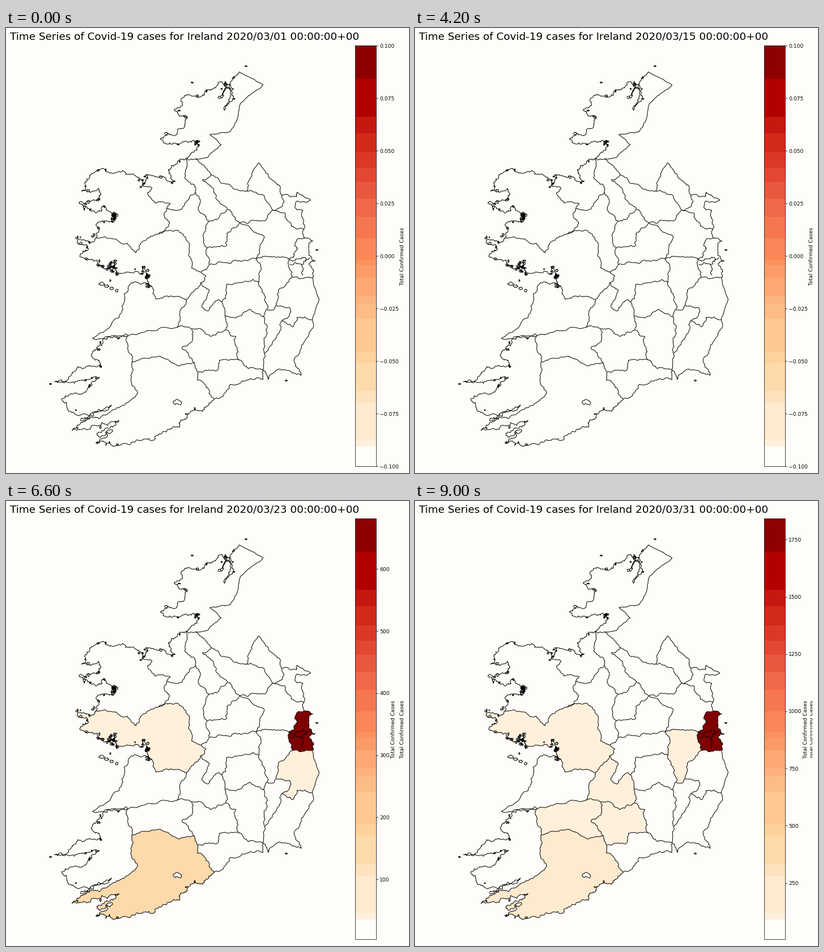
A matplotlib script that plays this animation: 711x787 px, repeating every 9300 ms.

```python
import numpy as np
import matplotlib.pyplot as plt
from matplotlib.animation import FuncAnimation
from matplotlib.collections import LineCollection
from matplotlib.patches import Polygon, Rectangle

W, H, DPI = 711, 787, 64
PX = 72 / DPI          # points per pixel
EM = 9.19 * PX         # small text; the title is twice as large
BG = "#fefdf9"
plt.rcParams["font.family"] = "DejaVu Sans"
rng = np.random.default_rng(19)

fig = plt.figure(figsize=(W / DPI, H / DPI), dpi=DPI, facecolor=BG)
ax = fig.add_axes([0, 0, 1, 1])
ax.set(xlim=(-0.5, W - 0.5), ylim=(H - 0.5, -0.5))
ax.axis("off")

# ---- map: borders run between shared junctions ------------------------
NODES = dict(
    mal=(411, 77), don=(317, 231), erne=(334, 231), cav=(361, 258), lei=(390, 320),
    car=(357, 341), slg=(334, 290), glen=(283, 319), moy=(240, 279), ros=(268, 364),
    kil=(160, 371), inny=(355, 388), ree=(358, 418), shan=(344, 431), port=(343, 450),
    derg=(318, 480), kin=(257, 457), lim=(301, 529), est=(214, 544), new=(327, 532),
    gal=(332, 592), mul=(222, 590), ken=(148, 687), tip=(338, 608), you=(367, 656),
    wat=(453, 604), sui=(412, 587), urn=(387, 533), dur=(386, 508), bir=(380, 484),
    mon=(446, 449), ede=(441, 408), may=(499, 409), bla=(504, 440), bray=(541, 440),
    ath=(476, 490), cas=(460, 497), barr=(455, 511), bal=(486, 517), ark=(540, 516),
    bor=(456, 575), gor=(527, 371), dro=(525, 356), fin=(412, 344), kells=(471, 322),
    clon=(424, 288), cul=(486, 295), carl=(512, 298))
paths, loops = {}, []


def roughen(p, r, levels):
    """Midpoint displacement: a natural line from a few points."""
    p = np.asarray(p, float)
    for _ in range(levels):
        d = np.diff(p, axis=0)
        shift = rng.normal(0, r, (len(d), 1)).clip(-1.5 * r, 1.5 * r)
        shift *= np.minimum(1, 16 / np.hypot(*d.T))[:, None]
        mid = (p[:-1] + p[1:]) / 2 + np.c_[-d[:, 1], d[:, 0]] * shift
        out = np.empty((2 * len(p) - 1, 2))
        out[::2], out[1::2] = p, mid
        p = out
    return p


def border(a, b, *xy, r=0.13, levels=4):
    bends = [xy[i:i + 2] for i in range(0, len(xy), 2)]
    paths[a, b] = roughen([NODES[a], *bends, NODES[b]], r, levels)


def isle(x, y, w, h):
    a = np.linspace(0, 2 * np.pi, 7)
    loops.append(roughen(np.c_[x + w / 2 * np.cos(a), y + h / 2 * np.sin(a)], 0.2, 2))


def scatter(points, spread):
    for x, y in points:
        dx, dy = rng.normal(0, spread, 2)
        isle(x + dx, y + dy, *rng.uniform(1.5, 5, 2))


def wild(a, b, *xy, isles=6):
    """Torn coast with small islands strewn along it."""
    border(a, b, *xy, r=0.22, levels=5)
    scatter(rng.choice(paths[a, b], isles), 3)


# north
border("mal", "erne", 453, 100, 413, 133, 407, 163, 395, 183, 359, 188, 379, 206, 354, 229, r=0.06)
wild("don", "mal", 340, 208, 336, 200, 300, 204, 272, 195, 308, 178, 317, 159, 296, 144, 317, 118,
     350, 112, 381, 95, 380, 124, 386, 94, 395, 122, 385, 145, 402, 125, 394, 100, isles=16)
border("don", "erne")
border("erne", "cav", 353, 248)
border("cav", "lei", 346, 268, 360, 278, 371, 303)
border("lei", "car", 372, 338)
border("don", "slg", 316, 251, 315, 264, 331, 276)
border("slg", "car", 342, 307, 341, 325)
border("car", "inny", 347, 366)
wild("don", "moy", 286, 250, 298, 270, 268, 264, 246, 259)
border("moy", "glen", 257, 283, 249, 291, 262, 309, 289, 310)
border("slg", "glen", 317, 307, 310, 320)
border("glen", "ros", 279, 333, 288, 343)
border("cav", "clon", 378, 273)
border("clon", "cul", 428, 270, 445, 238, 462, 258, 482, 278)
border("clon", "kells", 452, 294)
border("cul", "kells", 487, 315)
border("cul", "carl")
border("carl", "dro", 513, 290, 537, 304, 512, 306, 513, 321, 523, 322)
border("kells", "dro", 492, 327, 503, 350)
border("kells", "fin", 455, 341)
border("lei", "fin")

# west
wild("moy", "kil", 229, 262, 173, 250, 147, 260, 133, 288, 163, 283, 160, 304, 128, 309, 160, 326,
     172, 313, 194, 327, 190, 342, 160, 346, isles=24)
border("kil", "ros", 213, 380, 229, 397, 249, 371)
border("ros", "shan", 302, 357, 318, 375, 327, 424)
border("shan", "port", 352, 438)
border("port", "derg", 333, 462)
border("derg", "kin", 294, 474, 264, 479)
wild("kin", "kil", 250, 450, 253, 437, 240, 424, 243, 432, 195, 437, 185, 412, 172, 425, 160, 410,
     130, 404, 145, 390, 122, 371, 145, 377, isles=24)
border("kin", "est", 241, 451, 221, 450, 208, 470, 199, 512, 152, 548)
border("est", "lim", 238, 538)
border("derg", "lim", 306, 505)

# middle
border("fin", "inny", 389, 363, 388, 385)
border("fin", "ede", 454, 367, 447, 396)
border("ede", "ree", 415, 412, 389, 415)
border("inny", "ree")
border("ree", "shan")
border("port", "bir", 358, 463, 345, 492, 356, 500, 374, 480)
border("bir", "dur")
border("dur", "urn")
border("bir", "mon", 389, 468, 388, 454, 435, 444)
border("dur", "barr", 412, 509, 430, 497)
border("barr", "cas")
border("ede", "may", 456, 403)
border("ath", "cas", 471, 498)
border("cas", "mon", 455, 470)
border("mon", "ede", 449, 421)

# east
border("dro", "gor")
border("may", "bla")
border("bla", "ath", 480, 463)
border("bla", "bray", 519, 443)
border("bray", "ark", 552, 480, r=0.06)
border("ark", "bal", 513, 511, 505, 528)
border("bal", "ath", 500, 505, 500, 494)
border("bray", "gor", 534, 417, 545, 411, 534, 402, 541, 376, r=0.2)
border("gor", "may", 510, 379, 508, 397, r=0.2)
border("barr", "bor", 460, 541)
border("bal", "bor", 476, 548)
border("bor", "wat")
border("wat", "ark", 462, 621, 480, 603, 520, 614, 508, 585, 532, 546)

# south
border("lim", "new")
border("new", "urn", 346, 533, 362, 545)
border("urn", "sui", 405, 545)
border("sui", "tip", 376, 587, 372, 605)
border("sui", "wat", 427, 602)
border("wat", "you", 453, 621, 395, 630, 380, 652)
border("new", "gal", 327, 555, 310, 566)
border("gal", "mul", 292, 592, 272, 580)
border("est", "mul", 214, 565)
border("gal", "tip")
border("tip", "you", 337, 622, 358, 640)
border("mul", "ken", 220, 620, 232, 645, 214, 662, 165, 690)
wild("you", "ken", 350, 674, 320, 681, 306, 705, 270, 717, 193, 738, 158, 733, 188, 712,
     160, 720, 199, 694, 116, 711)
wild("est", "ken", 181, 545, 152, 573, 168, 598, 130, 599, 85, 625, 164, 617, 150, 632,
     98, 655, 122, 683, 185, 666, 131, 693, isles=12)

# inner city borders, lake, islands and the densest bays
for line in ([NODES["may"], (522, 405), (536, 405)], [(500, 418), (521, 419), (522, 437)],
             [(521, 419), (530, 408)]):
    loops.append(roughen(line, 0.2, 4))
isle(302, 662, 15, 8)
lake = loops[-1]
for k in range(4):
    isle(168 + 9 * k, 452 + 4 * k, 11 - 2 * k, 5)
for x, y in ((423, 67), (328, 96), (548, 392), (494, 623), (78, 629)):
    isle(x, y, 4, 2)
for x, y, n, spread in ((182, 424, 24, 6), (189, 332, 16, 3), (337, 203, 8, 2), (250, 440, 8, 3)):
    scatter([(x, y)] * n, spread)


def ring(spec):
    names = spec.split()
    sides = zip(names, names[1:] + names[:1])
    return np.vstack([paths[a, b] if (a, b) in paths else paths[b, a][::-1] for a, b in sides])


RINGS = dict(
    galway="kil ros shan port derg kin", cork="gal mul ken you tip", dublin="gor may bla bray",
    wicklow="bla bray ark bal ath", kildare="ede may bla ath cas mon",
    limerick="lim new gal mul est", tipp_n="port bir dur urn new lim derg",
    tipp_s="new urn sui tip gal")
areas = {k: ax.add_patch(Polygon(ring(s), fc=BG, ec="none", zorder=1)) for k, s in RINGS.items()}
ax.add_patch(Polygon(lake, fc=BG, ec="none", zorder=1.5))
ax.add_collection(LineCollection([*paths.values(), *loops], colors="k", linewidths=PX, zorder=2))

# ---- colour bar -------------------------------------------------------
X0, X1, TOP, BOT = 615, 652, 31, 775
EDGES = [31, 90, 157, 186, 220, 247, 272, 302, 334, 372, 409, 419, 441, 473, 487, 514,
         572, 592, 642, 662, 728, 740, 775]
orrd = plt.get_cmap("OrRd")


def shade(t):
    """Stepped colour at height t; the lowest step equals the page."""
    i = int(np.clip(np.searchsorted(EDGES, BOT - t * (BOT - TOP)), 1, len(EDGES) - 1))
    if i == len(EDGES) - 1:
        return BG
    return orrd((BOT - (EDGES[i - 1] + EDGES[i]) / 2) / (BOT - TOP))


for a, b in zip(EDGES, EDGES[1:]):
    color = shade((BOT - (a + b) / 2) / (BOT - TOP))
    ax.add_patch(Rectangle((X0, a), X1 - X0, b - a, fc=color, lw=0, antialiased=False))
ax.add_patch(Rectangle((X0, TOP), X1 - X0, BOT - TOP, fc="none", ec="k", lw=0.08 * EM, zorder=3))
marks = [(ax.plot([], [], "k", lw=0.08 * EM)[0],
          ax.text(0, 0, "", size=EM, va="center_baseline")) for _ in range(10)]


def side_label(x, z):
    return ax.text(x, 403, "Total Confirmed Cases", size=EM, rotation=90,
                   ha="center", va="center", zorder=z)


side_label(699.5, 4)
cover = ax.add_patch(Rectangle((682, 340), 14.5, 126, fc=BG, lw=0, zorder=5))
label = side_label(683.5, 6)
title = ax.text(6.5, 20, "", size=2 * EM, va="baseline")

# ---- data -------------------------------------------------------------
START = 21
SINCE = dict(galway=START, kildare=28, limerick=28, tipp_n=30, tipp_s=30)


def scale(day):
    if day < START:
        return -0.1, 0.1, 0.025, 3
    d = day - START
    hi = 471 + 97 * d + 4 * d * d
    return 3, hi, 100 if hi < 900 else 200 if hi < 1800 else 250, 0


def level(name, day):
    """Share of the colour range reached by one area."""
    if day < START:
        return 0
    if name == "dublin":
        return 1
    if name == "cork":
        return 0.2 - 0.07 * max(0, day - 25) / 6
    if name == "wicklow":
        return 0.055 * (23 <= day <= 27)
    return 0.055 * (day >= SINCE[name])


def update(i):
    day = i + 1
    title.set_text(f"Time Series of Covid-19 cases for Ireland 2020/03/{day:02d} 00:00:00+00")
    for name, area in areas.items():
        t = level(name, day)
        area.set_facecolor(orrd(1.0) if t == 1 else shade(t))
    lo, hi, step, digits = scale(day)
    first = np.ceil(lo / step - 1e-6)
    for k, (tick, text) in enumerate(marks):
        v = (first + k) * step
        y = BOT - (BOT - TOP) * (v - lo) / (hi - lo)
        for part in (tick, text):
            part.set_visible(v <= hi + 1e-6)
        tick.set_data([X1 + 0.5, X1 + 3.7], [y, y])
        text.set_position((X1 + 6.9, y))
        text.set_text(f"{v + 0.0:.{digits}f}".replace("-", "\u2212"))
    wide = hi >= 1000
    cover.set_visible(wide)
    label.set_visible(day >= START)
    label.set_x(689.5 if wide else 683.5)
    return []


anim = FuncAnimation(fig, update, frames=31, interval=300, repeat=True, init_func=lambda: [])
plt.show()
```
